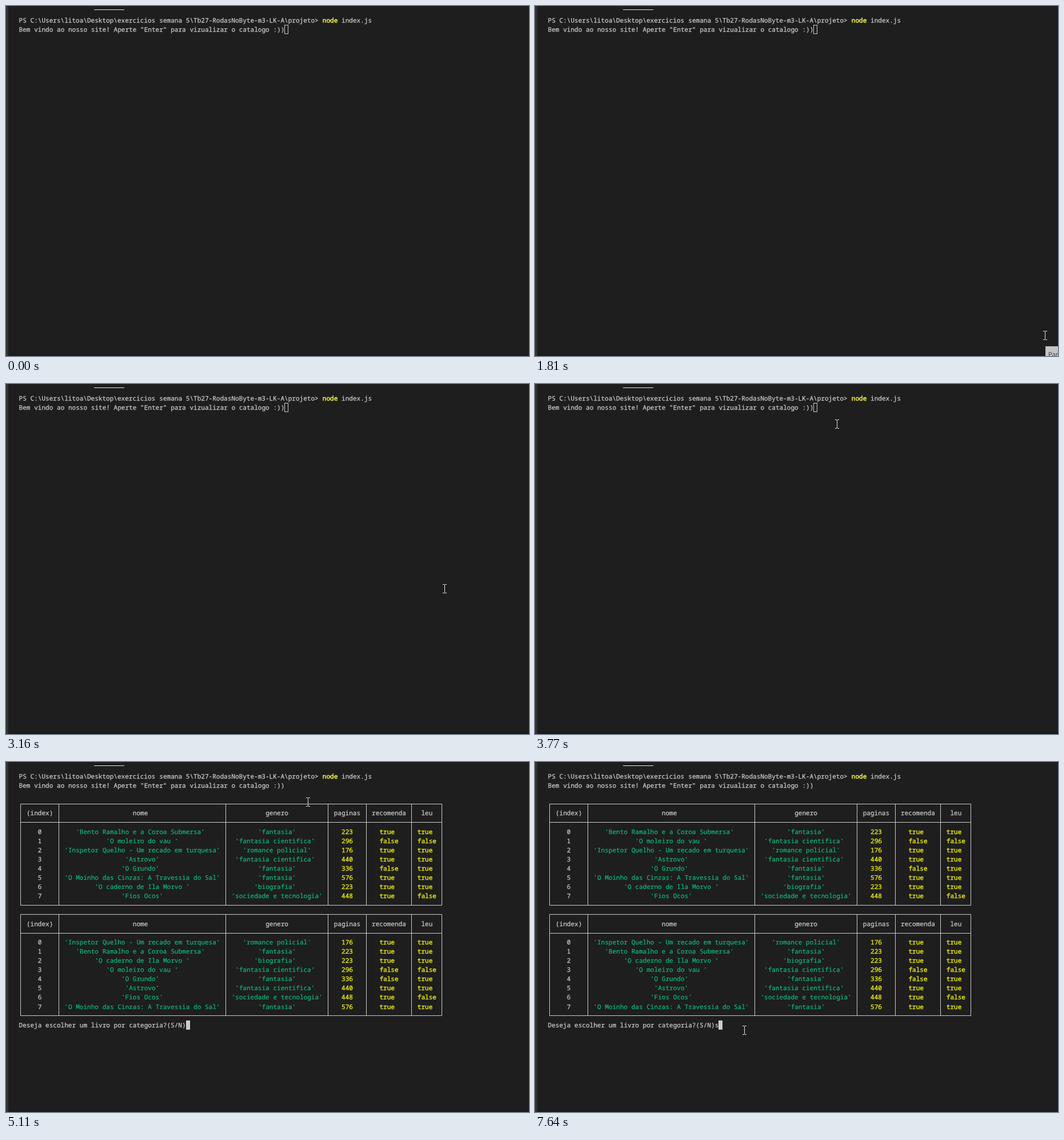
These frames come from a looping animation (915 by 612 pixels, 8 s). An HTML page:

```html
<!DOCTYPE html>
<html lang="pt">
<head>
<meta charset="utf-8">
<title>Terminal</title>
<style>
  html, body { margin: 0; width: 100%; height: 100%; overflow: hidden; background: #1e1e1e; }
  svg { display: block; width: 915px; height: 612px; }
  text { font: 11.067px "Noto Sans Mono", monospace; text-rendering: geometricPrecision; }
  .out { fill: #ccc; stroke: #ccc; stroke-width: .25; }
  .cmd { fill: #f5f543; stroke: #f5f543; stroke-width: .5; }
  .str { fill: #0dbc79; stroke: #0dbc79; stroke-width: .2; }
  .val { fill: #e5e510; stroke: #e5e510; stroke-width: .45; }
  .grid { fill: none; stroke: #ccc; }
  #tip text { font: 11px "Open Sans", sans-serif; fill: #333; }
  #mouse { fill: none; stroke: #e6e6e6; }
</style>
</head>
<body>
<svg id="stage" viewBox="0 0 915 612">
  <rect width="915" height="612" fill="#1e1e1e"/>
  <rect y="608" width="915" height="4" fill="#1b1b1b"/>
  <rect width="4" height="612" fill="#333"/>
  <rect x="154" y="6" width="53" height="1" fill="#e7e7e7"/>
  <g id="intro"></g>
  <g id="tables"></g>
  <g id="typed"></g>
  <rect id="caret"/>
  <g id="tip">
    <rect x="893" y="595" width="22" height="17" fill="#c4c4c4"/>
    <text x="898" y="613">Par</text>
  </g>
  <circle id="click" cx="528" cy="70.5" r="10.5" fill="#ff0" fill-opacity=".47"/>
  <path id="mouse" d="M-3.5-7.5h3m1 0h3M-3.5 7.5h3m1 0h3M0-7V7"/>
</svg>
<script>
const LOOP = 8000, TICK = 67.5;
const X0 = 22.6, Y0 = 17.3, CW = 6.64, RH = 16.1;
const $ = id => document.getElementById(id);
const colX = c => X0 + c * CW;
const rowY = r => Y0 + r * RH;
const crisp = v => Math.floor(v) + 0.5;

function add(parent, tag, attrs) {
  const el = document.createElementNS('http://www.w3.org/2000/svg', tag);
  for (const name in attrs) el.setAttribute(name, attrs[name]);
  return parent.appendChild(el);
}

// Every word sits on the character grid.
function print(parent, row, col, str, cls = 'out') {
  const line = add(parent, 'text', { y: Math.round(rowY(row) + 11.7), class: cls });
  for (const word of str.matchAll(/\S+/g))
    add(line, 'tspan', { x: colX(col + word.index) }).textContent = word[0];
}

const heads = ['(index)', 'nome', 'genero', 'paginas', 'recomenda', 'leu'];
const bars = [0, 10, 54, 81, 91, 103, 111];
const books = [
  ['Bento Ramalho e a Coroa Submersa', 'fantasia', 223, true, true],
  ['O moleiro do vau ', 'fantasia cientifica', 296, false, false],
  ['Inspetor Quelho - Um recado em turquesa', 'romance policial', 176, true, true],
  ['Astrovo', 'fantasia cientifica', 440, true, true],
  ['O Grundo', 'fantasia', 336, false, true],
  ['O Moinho das Cinzas: A Travessia do Sal', 'fantasia', 576, true, true],
  ['O caderno de Ila Morvo ', 'biografia', 223, true, true],
  ['Fios Ocos', 'sociedade e tecnologia', 448, true, false]
];

function table(parent, top, list) {
  const mid = r => crisp(rowY(r + 0.5));
  const xs = bars.map(c => crisp(colX(c + 0.5)));
  const bottom = top + list.length + 3;
  const d = [top, top + 2, bottom].map(r => `M${xs[0]} ${mid(r)}H${xs[6]}`)
    .concat(xs.map(x => `M${x} ${mid(top)}V${mid(bottom)}`)).join('');
  add(parent, 'path', { d, class: 'grid' });

  const cell = (row, i, str, cls) => {
    const pad = Math.floor((bars[i + 1] - bars[i] - 1 - str.length) / 2);
    print(parent, row, bars[i] + 1 + pad, str, cls);
  };
  heads.forEach((h, i) => cell(top + 1, i, h));
  list.forEach((book, n) => {
    const row = top + 3 + n;
    cell(row, 0, String(n));
    book.forEach((v, i) => typeof v === 'string'
      ? cell(row, i + 1, `'${v}'`, 'str')
      : cell(row, i + 1, String(v), 'val'));
  });
}

print($('intro'), 0, 0, 'PS C:\\Users\\litoa\\Desktop\\exercicios semana 5\\Tb27-RodasNoByte-m3-LK-A\\projeto>');
print($('intro'), 0, 80, 'node', 'cmd');
print($('intro'), 0, 85, 'index.js');
print($('intro'), 1, 0, 'Bem vindo ao nosso site! Aperte "Enter" para vizualizar o catalogo :))');
table($('tables'), 3, books);
table($('tables'), 15, [...books].sort((a, b) => a[2] - b[2]));
print($('tables'), 27, 0, 'Deseja escolher um livro por categoria?(S/N)');
print($('typed'), 27, 44, 's');

// start, steps, from, to
const moves = [
  [1810, 4, [892, 576], [769, 363]],
  [3160, 9, [767, 358], [528, 70]],
  [5570, 7, [526, 74], [365, 474]],
  [6110, 1, [365, 472], [366, 469]]
];
// start, row, column, filled
const carets = [
  [0, 1, 70, false],
  [4230, 1, 70, true],
  [5040, 2, 0, true],
  [5110, 27, 44, true],
  [7640, 27, 45, true]
];

const latest = (list, t) => list.filter(item => item[0] <= t).pop();
const smooth = p => p * p * (3 - 2 * p);
const show = (id, on) => $(id).setAttribute('visibility', on ? 'visible' : 'hidden');

function drawMouse(t) {
  const move = latest(moves, t);
  show('mouse', move);
  if (!move) return;
  const [start, steps, from, to] = move;
  const p = smooth(Math.min(steps, Math.floor((t - start) / TICK)) / steps);
  const [x, y] = from.map((v, i) => Math.round(v + (to[i] - v) * p));
  $('mouse').setAttribute('transform', `translate(${x + 0.5} ${y})`);
}

function drawCaret(t) {
  const [, row, col, filled] = latest(carets, t);
  const inset = filled ? 0 : 0.5;
  const box = {
    x: Math.round(colX(col)) + inset,
    y: Math.round(rowY(row)) + inset,
    width: 7 - 2 * inset,
    height: 16 - 2 * inset,
    fill: filled ? '#ccc' : 'none',
    stroke: filled ? 'none' : '#ccc'
  };
  for (const name in box) $('caret').setAttribute(name, box[name]);
}

function draw(t) {
  show('tables', t >= 5110);
  show('typed', t >= 7640);
  show('click', t >= 4230 && t < 4360);
  show('tip', t >= 530 && t < 1880);
  $('tip').setAttribute('opacity', Math.min(1, (Math.floor((t - 530) / TICK) + 1) / 3));
  drawCaret(t);
  drawMouse(t);
}

const begin = performance.now();
function loop() {
  draw((performance.now() - begin) % LOOP);
  requestAnimationFrame(loop);
}
loop();
</script>
</body>
</html>
```
